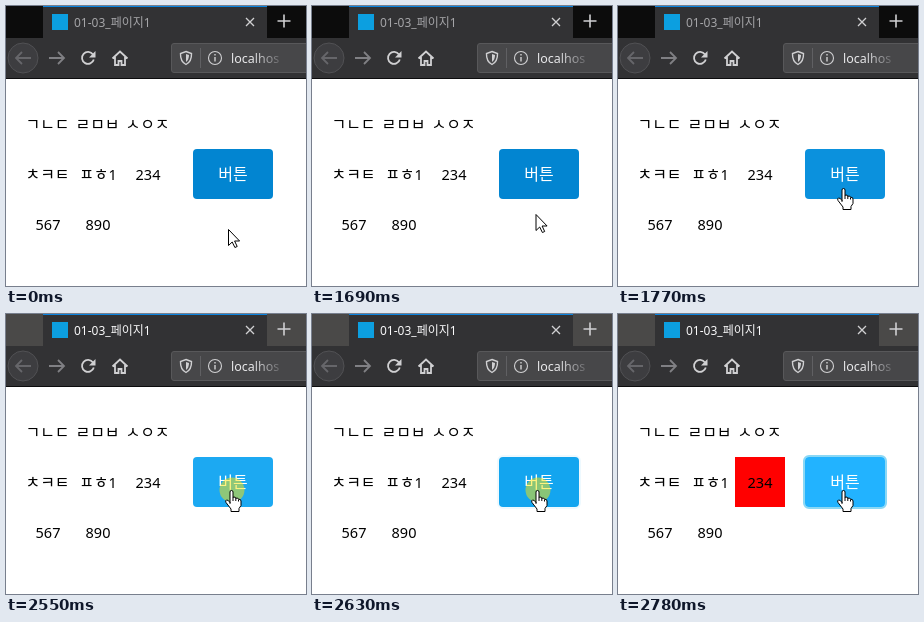
These frames come from a looping animation (300x280 px, 4.95 s). An HTML page:

```html
<!DOCTYPE html>
<html lang="ko">
<head>
<meta charset="utf-8">
<style>
  html, body { margin: 0; width: 100%; height: 100%; overflow: hidden; background: #fff; }
  svg { display: block; width: 300px; height: 280px; }
  text { font-family: "Noto Sans", "Noto Sans CJK KR", "Noto Sans CJK", sans-serif; }
  .cell { font-size: 16px; text-anchor: middle; }
  .digits { font-size: 14.5px; }
  .icon { fill: none; stroke: #d0d0d2; }
</style>
</head>
<body>
<svg viewBox="0 0 300 280">
  <defs>
    <linearGradient id="fade" gradientUnits="userSpaceOnUse" x1="246" x2="276">
      <stop stop-color="#e8e8ea"/>
      <stop offset="1" stop-color="#5b5b5e"/>
    </linearGradient>
  </defs>

  <!-- Browser chrome -->
  <rect id="strip" width="300" height="33"/>
  <rect y="32" width="300" height="41" fill="#323234"/>
  <rect x="37" width="224" height="33" fill="#323234"/>
  <rect x="37" width="224" height="1" fill="#0a84e0"/>
  <rect y="72" width="300" height="1" fill="#0c0c0d"/>
  <rect x="46" y="8" width="16" height="16" fill="#0c9fe0"/>
  <text id="title" x="68" y="20.5" font-size="12">01-03_페이지1</text>
  <path class="icon" stroke-width="1.3" d="M240 12l8 8m0-8l-8 8"/>
  <path class="icon" stroke-width="1.6" d="M271.5 15h13M278 8.500v13"/>

  <circle cx="17" cy="52" r="15" fill="#3d3d40" stroke="#515154"/>
  <g class="icon" stroke-width="1.8">
    <path stroke="#66666a" d="M25 52H10m6-6l-6 6 6 6"/>
    <path stroke="#808084" d="M43 52h15m-6-6l6 6-6 6"/>
    <path d="M87 48.500a6 6 0 1 0 .8 5"/>
    <path fill="#d0d0d2" stroke="none" d="M89.500 45v6.500H83z"/>
    <path d="M106.500 52.500l7.500-7 7.500 7M109 51v8h3.500v-4h3v4h3.500v-8"/>
  </g>
  <path d="M301 37.500H168q-2.500 0-2.500 2.500v24q0 2.500 2.500 2.500h133z" fill="#474749" stroke="#58585a"/>
  <path d="M194.500 42v20" stroke="#606063"/>
  <g class="icon" stroke-width="1.4">
    <path d="M180 45.500l5.500 2q.3 8-5.500 11-5.800-3-5.500-11z"/>
    <path fill="#d0d0d2" stroke="none" d="M180 48v8q3-2 3-7z"/>
    <circle cx="209" cy="52" r="6.500" stroke-width="1.100"/>
    <path d="M209 51v4.500M209 48v1.600"/>
  </g>
  <text x="225" y="57" font-size="12.5" fill="url(#fade)">localhos</text>

  <!-- Page -->
  <rect id="mark" x="117" y="143" width="50" height="50" fill="#f00"/>
  <g class="cell">
    <text x="41.5" y="124">ㄱㄴㄷ</text>
    <text x="91.5" y="124">ㄹㅁㅂ</text>
    <text x="141.5" y="124">ㅅㅇㅈ</text>
    <text x="41.5" y="174">ㅊㅋㅌ</text>
    <text x="92" y="174">ㅍㅎ<tspan class="digits">1</tspan></text>
    <text class="digits" x="142" y="174">234</text>
    <text class="digits" x="42" y="224">567</text>
    <text class="digits" x="92" y="224">890</text>
  </g>
  <rect id="halo" x="186" y="142" width="82" height="52" rx="5" fill="none" stroke="#8bd8f5" stroke-width="2"/>
  <rect id="button" x="187" y="143" width="80" height="50" rx="4"/>
  <text class="cell" x="227" y="173.5" fill="#fff">버튼</text>
  <circle id="press" cx="226" cy="176" r="12.5" fill="#ffe600"/>

  <g id="cursor" fill="#fff" stroke="#000" stroke-linejoin="round">
    <path id="arrow" d="M.5.500v16l3.700-3.500 2.700 5.500 2.300-1-2.600-5.500h5z"/>
    <g id="hand">
      <path d="M5.500 13.500V2a1.500 1.500 0 0 1 3 0V7.200q2.700-.7 2.800 1q2.600-.6 2.700 1q2.500-.2 2.500 1.800v4.500l-2 3v3h-8v-2.500l-5-6.500q-1-2 .5-2.500t3.500 2.500z"/>
      <path fill="none" d="M8.500 7v4M11.300 8v3M14 9.500v2"/>
    </g>
  </g>
</svg>
<script>
const LOOP = 4950;
const el = id => document.getElementById(id);

// Each step changes only the listed properties.
const steps = [
  { at: 0, x: 222, y: 223, hand: false, color: '#0285d1', focused: false, press: 0, halo: 0, mark: false },
  { at: 990, x: 223.5 },
  { at: 1690, y: 208 },
  { at: 1770, x: 218.5, y: 182, hand: true, color: '#0b91dd' },
  { at: 1860, y: 176, color: '#1ca9f2' },
  { at: 2550, focused: true, press: 0.5 },
  { at: 2630, color: '#13a5ef', halo: 0.15 },
  { at: 2700, color: '#1caefa', press: 0, halo: 0.7, mark: true },
  { at: 2780, color: '#22b3ff', halo: 1 }
];

function draw(time) {
  const s = Object.assign({}, ...steps.filter(step => step.at <= time));
  const set = (id, name, value) => el(id).setAttribute(name, value);
  set('cursor', 'transform', `translate(${s.x} ${s.y})`);
  set('arrow', 'opacity', s.hand ? 0 : 1);
  set('hand', 'opacity', s.hand ? 1 : 0);
  set('button', 'fill', s.color);
  set('strip', 'fill', s.focused ? '#4a4948' : '#0c0c0c');
  set('title', 'fill', s.focused ? '#f9f9fa' : '#a5a5a8');
  set('press', 'opacity', s.press);
  set('halo', 'opacity', s.halo);
  set('mark', 'opacity', s.mark ? 1 : 0);
}

const start = performance.now();
function tick() {
  draw((performance.now() - start) % LOOP);
  requestAnimationFrame(tick);
}
tick();
</script>
</body>
</html>
```
